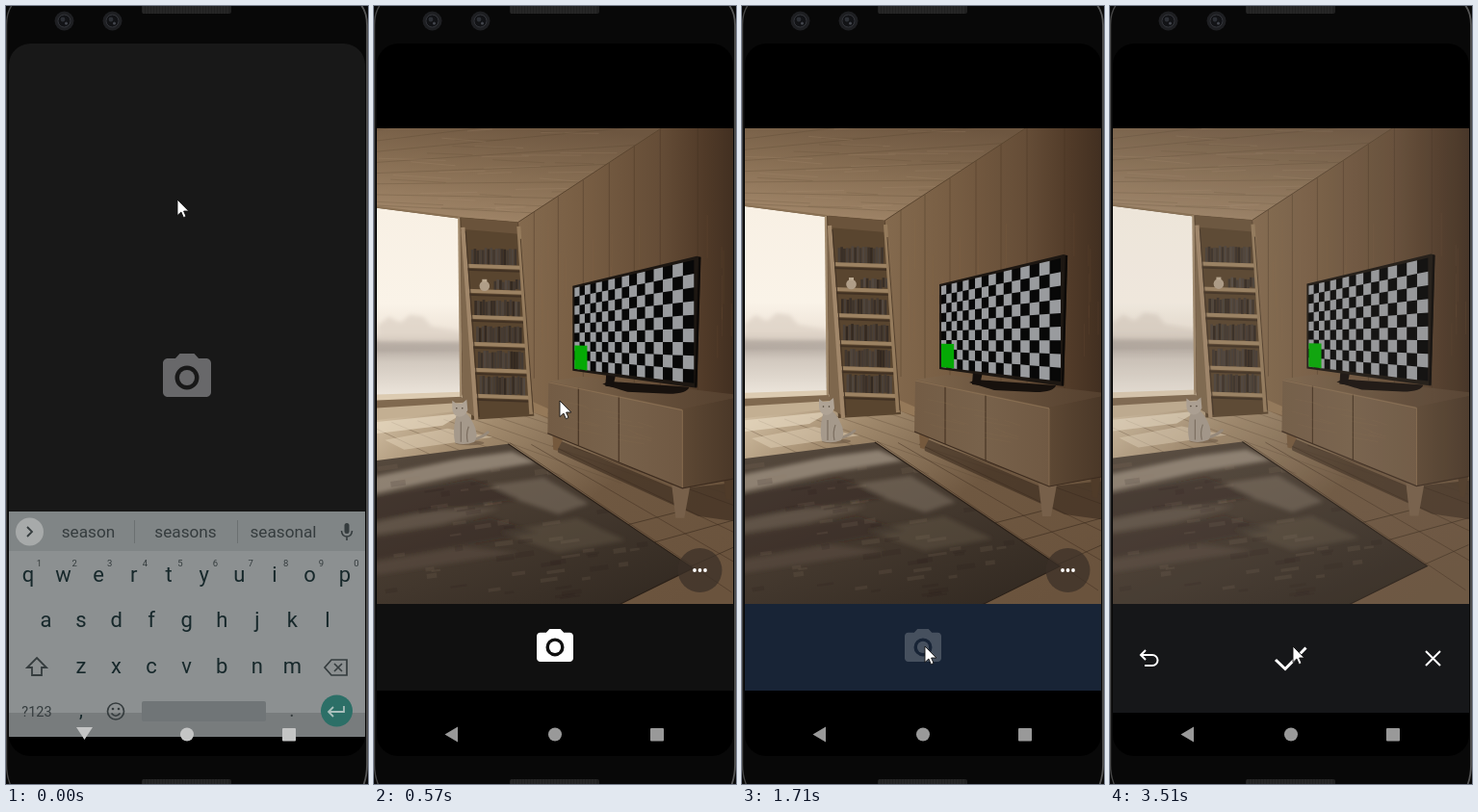
An HTML page for the animation above (3.81 s loop, 376 by 808 pixels).

```html
<!DOCTYPE html>
<html lang="en">
<head>
<meta charset="utf-8">
<title>Camera capture</title>
<style>
html, body { margin: 0; width: 100%; height: 100%; overflow: hidden; background: #000; }
svg { display: block; width: 376px; height: 808px; }
text { font-family: Roboto, "Noto Sans", sans-serif; text-anchor: middle; }
</style>
</head>
<body>
<svg id="stage" viewBox="0 0 376 808" xmlns="http://www.w3.org/2000/svg"></svg>
<script>
const LOOP = 3810;

// Seeded random numbers keep the textures stable.
let seed = 11;
const rnd = () => (seed = (seed * 16807) % 2147483647) / 2147483647;
const span = (a, b) => a + (b - a) * rnd();
const mix = (a, b, k) => a + (b - a) * k;
const list = (n, fn) => Array.from({ length: n }, (_, i) => fn(i)).join('');

const poly = (pts, fill, extra = '') => `<polygon points="${pts}" fill="${fill}" ${extra}/>`;
const rect = (x, y, w, h, fill, extra = '') =>
  `<rect x="${x}" y="${y}" width="${w}" height="${h}" fill="${fill}" ${extra}/>`;
const circle = (x, y, r, fill, extra = '') => `<circle cx="${x}" cy="${y}" r="${r}" fill="${fill}" ${extra}/>`;
const line = (d, stroke, w = 1, extra = '') =>
  `<path d="${d}" fill="none" stroke="${stroke}" stroke-width="${w}" ${extra}/>`;
const text = (x, y, size, fill, s, extra = '') =>
  `<text x="${x}" y="${y}" font-size="${size}" fill="${fill}" ${extra}>${s}</text>`;
const gradient = (id, dir, ...stops) => {
  const [x1, y1, x2, y2] = dir;
  return `<linearGradient id="${id}" x1="${x1}" y1="${y1}" x2="${x2}" y2="${y2}">` +
    stops.map(([o, c]) => `<stop offset="${o}" stop-color="${c}"/>`).join('') + '</linearGradient>';
};

const DOWN = [0, 0, 0, 1], RIGHT = [0, 0, 1, 0];
const defs = `<defs>
  ${gradient('sky', DOWN, [0, '#f8f0e4'], [.5, '#faf3e8'], [.65, '#eee4d8'], [.7, '#cbc0b5'], [.74, '#bab0a7'], [.8, '#d2c9bf'], [1, '#f0e9df'])}
  ${gradient('ceiling', [.6, 0, .2, 1], [0, '#6d5640'], [.5, '#876e53'], [1, '#a2876a'])}
  ${gradient('wall', RIGHT, [0, '#846a4e'], [.3, '#775d43'], [.62, '#654d37'], [.82, '#503a28'], [1, '#3c2b1e'])}
  ${gradient('floor', [0, 0, 1, .7], [0, '#d6c4a8'], [.25, '#a18a6d'], [.6, '#6f5841'], [1, '#6a533d'])}
  ${gradient('rug', [0, 0, .8, 1], [0, '#574b3f'], [.4, '#493d32'], [1, '#332a22'])}
  ${gradient('front', RIGHT, [0, '#735c45'], [.5, '#78624b'], [1, '#705943'])}
  ${gradient('top', RIGHT, [0, '#7f674d'], [.5, '#66503b'], [1, '#523e2d'])}
  ${gradient('side', RIGHT, [0, '#5d4834'], [1, '#463425'])}
  <clipPath id="screen"><rect x="3" y="39" width="370" height="740" rx="22"/></clipPath>
  <clipPath id="photo"><rect x="3" y="127" width="370" height="494"/></clipPath>
  <clipPath id="rugArea"><polygon points="-5,471 138,453 330,582 243,625 -5,625"/></clipPath>
  <clipPath id="ceilArea"><polygon points="-5,120 305,120 148,223 88,218 -5,207"/></clipPath>
  <filter id="soft" x="-20%" y="-50%" width="140%" height="200%"><feGaussianBlur stdDeviation="2.2"/></filter>
</defs>`;

const CAMERA = 'M9 2L7.17 4H4c-1.1 0-2 .9-2 2v12c0 1.1.9 2 2 2h16c1.1 0 2-.9 2-2V6c0-1.1-.9-2-2-2h-3.17L15 2z' +
  'M12 17a5 5 0 1 1 0-10a5 5 0 0 1 0 10z';
const cameraIcon = (id, cx, cy, k, fill) =>
  `<g id="${id}" transform="translate(${cx - 12 * k} ${cy - 11 * k}) scale(${k})" fill="${fill}">
    <path fill-rule="evenodd" d="${CAMERA}"/><circle cx="12" cy="12" r="3.2"/></g>`;

function body() {
  const lens = x => circle(x, 15.5, 10, '#1e1f22') + circle(x, 15.5, 6.5, '#121316', 'stroke="#33353a"') +
    circle(x - 1.5, 14, 2.4, '#2c2f35') + circle(x + 2, 18, 1.5, '#44474e');
  const grille = (y, h) => rect(141, y, 93, h, '#202020', 'rx="2"') +
    list(30, i => line(`M${143 + i * 3} ${y}v${h}`, '#303030', .8));
  return rect(0, 0, 376, 808, '#080808') +
    line('M7 -2Q.5 6 .5 20V788Q.5 800 5 810', '#454545', 1.4) +
    line('M368 -2Q375 6 375 20V788Q375 800 371 810', '#565656', 1.8) +
    grille(-2, 10) + grille(803, 8) + lens(60.5) + lens(110.5) +
    rect(3, 39, 370, 740, '#000', 'rx="22"');
}

function windowView() {
  return poly('-5,207 87,219 88,403 -5,408', 'url(#sky)') +
    `<g filter="url(#soft)">${poly('3,330 14,321 26,327 36,319 50,321 58,331 88,336 88,346 3,346', '#dcd1c5', 'opacity=".7"')}
     ${poly('-5,346 89,347 89,355 -5,357', '#aaa098', 'opacity=".5"')}</g>` +
    poly('-5,402 89,399 91,406 -5,410', '#dccbb1') +
    poly('-5,408 90,404 93,411 -5,417', '#80694f') +
    poly('-5,416 93,410 95,419 -5,430', '#c3af92') +
    line('M-5 206L88 218', '#8a7154', 2) + line('M87 218L89 404', '#a18a6d', 2.4);
}

function shelf() {
  const left = y => 91 + (y - 230) * .066, right = y => 149 + (y - 228) * .067;
  const rows = [[249, 268], [282, 294], [303, 321], [330, 349], [356, 376], [382, 403]];
  const book = (x, top, base) => {
    const tone = span(40, 74) | 0;
    return rect(x, top + span(0, 3), 2.6, base - top - 2, `rgb(${tone + 10},${tone},${tone - 8})`);
  };
  let out = poly('88,218 148,223 165,424 100,428', '#59452f') + poly('89,218 148,223 149,235 90,230', '#6a533b') +
    poly('89,232 92,232 104,425 91,418', '#7e674d');
  rows.forEach(([top, base], r) => {
    const x0 = left(base) + 6, n = r === 1 ? 10 : 17;
    out += list(n, i => book(x0 + (r === 1 ? 22 : 0) + i * 2.8, top, base));
    out += poly(`${left(base)},${base - 2} ${right(base)},${base} ${right(base)},${base + 4} ${left(base)},${base + 2}`, '#9c8262');
    out += line(`M${left(base)} ${base + 4}L${right(base)} ${base + 6}`, '#33261c', 2, 'opacity=".6"');
  });
  return out + circle(113.5, 289, 5.3, '#b09e88') + rect(111, 282, 5, 3, '#bba991') +
    line('M91 228L105 428', '#a1876a', 4.2) + line('M94 232L108 425', '#443426', 1) +
    line('M149 227L162 422', '#957b5c', 4) + line('M151 240L164 420', '#54402d', 1);
}

function walls() {
  return poly('148,223 305,120 385,120 385,415 180,430 163,424', 'url(#wall)') +
    [[165, 212], [190, 196], [216, 179], [243, 161], [269, 143], [296, 124], [335, 120]].map(([x, y]) =>
      line(`M${x} ${y}V${385 + (x - 165) * .1}`, '#402f20', 1, 'opacity=".35"')).join('') +
    list(28, () => {
      const x = span(170, 370), y = span(215, 330);
      return line(`M${x} ${y}v${span(15, 60)}`, '#987553', 1, 'opacity=".1"');
    }) +
    line('M148 223L163 420', '#57422e', 1.4) +
    poly('163,409 181,417 181,426 163,420', '#957959') +
    poly('-5,120 305,120 148,223 88,218 -5,207', 'url(#ceiling)') +
    `<g clip-path="url(#ceilArea)">
      ${list(9, i => line(`M-5 ${128 + i * 11}L310 ${80 + i * 20}`, '#493727', .8, 'opacity=".25"'))}
      ${list(34, () => {
        const x = span(0, 220), y = span(128, 215);
        return line(`M${x} ${y}l${span(25, 70)} ${span(-2, 4)}`, rnd() > .5 ? '#b0957a' : '#574331', 1, 'opacity=".18"');
      })}</g>` +
    line('M148 223L305 120', '#5b4630', 1) + line('M-5 207L88 218L148 223', '#6a543c', 1.2);
}

function ground() {
  const glow = (pts, tone, o) => poly(pts, tone, `opacity="${o}"`);
  return poly('-5,429 95,418 163,420 182,428 385,510 385,630 -5,630', 'url(#floor)') +
    list(8, i => line(`M${-10 + i * 27} ${432 - i * 1.5}L${70 + i * 62} ${470 + i * 8}`, '#604d38', .9, 'opacity=".4"')) +
    list(5, i => line(`M${140 + i * 22} ${452 + i * 1.5}L${370 + i * 12} ${607 - i * 26}`, '#3d2c1e', 1, 'opacity=".45"')) +
    glow('-5,431 92,421 70,434 -5,443', '#eddfc8', .6) +
    glow('10,449 75,437 122,446 30,459', '#e3d3b9', .5) +
    glow('186,447 312,500 385,492 385,535 335,528 190,462', '#34261a', .55) +
    line('M262 537L317 523M317 585L373 560M290 555L373 532', '#392a1d', 1, 'opacity=".6"') +
    poly('-5,471 138,453 330,582 243,625 -5,625', 'url(#rug)') +
    `<g clip-path="url(#rugArea)"><g filter="url(#soft)">
      ${glow('-5,488 90,468 142,461 168,472 90,485 -5,506', '#a39686', .75)}
      ${glow('120,496 175,488 222,515 190,526 150,512', '#86796a', .5)}
      ${glow('-5,536 60,522 130,520 70,536 -5,548', '#7b6e5f', .45)}
      ${glow('130,545 210,530 260,553 190,566', '#6f6152', .35)}
      ${glow('-5,577 90,560 150,566 -5,590', '#6a5c4d', .35)}
      ${glow('-5,508 100,490 150,510 -5,533', '#2b221b', .35)}
      ${glow('-5,551 120,530 170,545 -5,574', '#2b221b', .3)}</g>
      ${list(70, () => {
        const x = span(0, 290), y = span(462, 615);
        return rect(x, y, span(8, 22), span(2, 6), rnd() > .5 ? '#8b7b69' : '#211a14',
          `opacity=".15" transform="rotate(-8 ${x} ${y})"`);
      })}</g>` +
    line('M138 453L330 582L243 625', '#2a2018', 1.2);
}

function cat() {
  return `<ellipse cx="98" cy="452" rx="15" ry="2.5" fill="#6a5743" opacity=".6"/>` +
    line('M101 449Q112 446 117 441', '#978a7b', 3, 'stroke-linecap="round"') +
    `<path d="M84 424Q80 440 83 452Q93 455 103 451Q108 444 102 432Q98 424 94 421Z" fill="#a5998b"/>
     <path d="M80 408L84 411H90L95 407L96 418Q93 425 87 425Q80 423 80 416Z" fill="#afa395"/>` +
    line('M89 430V451M97 435Q94 443 96 451', '#7b6e60', 1.2) + circle(84.5, 416, .8, '#4c4034') + circle(90.5, 416, .8, '#4c4034');
}

function cabinet() {
  return poly('362,488 373,486 369,511 364,510', '#4f3b29') +
    poly('184,441 196,446 189,460 185,459', '#75593d') +
    poly('308,496 327,497 321,530 312,530', '#77604a') +
    poly('319,417 385,403 385,487 319,499', 'url(#side)') +
    poly('180,388 214,383 385,403 319,417', 'url(#top)') +
    poly('180,388 319,417 319,499 179,442', 'url(#front)') +
    line('M211 395V455M253 404V472', '#493625', 1.2) +
    line('M180 389L319 418V499', '#8e7355', .8) + line('M179 442L319 499L373 489', '#3d2c1f', 1.2) +
    list(16, () => {
      const x = span(184, 285), y = 396 + (x - 180) * .22 + span(4, 38);
      return line(`M${x} ${y}l${span(10, 28)} 5`, '#8d7253', 1, 'opacity=".15"');
    });
}

function tv() {
  const L = { x: 207, top: 291, base: 375 }, R = { x: 331, top: 262, base: 390 };
  const cols = 16, rows = 9;
  const at = (u, v) => {
    const a = (1 - u) / (L.base - L.top), b = u / (R.base - R.top), k = b / (a + b);
    const y = mix(mix(L.top, R.top, k), mix(L.base, R.base, k), v);
    return `${mix(L.x, R.x, k).toFixed(2)},${y.toFixed(2)}`;
  };
  const quad = (u0, v0, u1, v1) => [at(u0, v0), at(u1, v0), at(u1, v1), at(u0, v1)].join(' ');
  let out = `<path d="M236 391L243 388L270 390L326 394Q324 401 305 401L262 399Z" fill="#17110d"/>` +
    poly('240,379 250,380 247,394 239,393', '#15100d') +
    poly('205,289 334,258 338,259 334,395 205,377', '#1d1712') + line('M337 259L333 394', '#0d0a08', 2.4) +
    poly(quad(0, 0, 1, 1), '#080808');
  for (let r = 0; r < rows; r++)
    for (let c = 0; c < cols; c++)
      if ((r + c) % 2 === 0) out += poly(quad(c / cols, r / rows, (c + 1) / cols, (r + 1) / rows), '#999b9e');
  return out + poly(quad(0, .71, .153, 1), '#05a905');
}

const room = () => `<g clip-path="url(#photo)"><g id="room">
  ${rect(-10, 110, 400, 530, '#6b543d')}${walls()}${windowView()}${ground()}${shelf()}${cat()}${cabinet()}${tv()}</g></g>`;

const navShapes = (back, fill) => poly(back, fill) + circle(188, 756.5, 7, fill) + rect(287, 750, 14, 13.5, fill, 'rx="1"');

function keyboard() {
  const ink = '#17282b', dim = '#353c3e';
  const row = (keys, x, y) => [...keys].map((k, i) => text(x + i * 36.55, y, 22, ink, k)).join('');
  return rect(3, 525, 370, 234, '#8c9091') + rect(3, 525, 370, 41, '#808586') +
    circle(24.5, 546, 14.5, '#a7aaaa') + line('M22 541L27 546L22 551', dim, 1.8) +
    line('M133.5 534V558M240.5 534V558', '#6b7071', 1) +
    [[85.5, 'season'], [186.5, 'seasons'], [288, 'seasonal']].map(([x, s]) => text(x, 552, 17.2, dim, s)).join('') +
    rect(351.5, 537, 5, 11, dim, 'rx="2.5"') + line('M348.5 545Q349 551 354 551T359.5 545M354 551V555', dim, 1.6) +
    row('qwertyuiop', 23, 598) + row('asdfghjkl', 41.5, 645) + row('zxcvbnm', 78, 693) +
    [...'1234567890'].map((n, i) => text(34.5 + i * 36.6, 582, 9.5, dim, n)).join('') +
    line('M32 677L42 687H37V695H27V687H22Z', dim, 1.8) +
    line('M338 679H354V695H338L331 687ZM341 683L349 691M349 683L341 691', dim, 1.7) +
    rect(3, 734, 370, 25, '#000', 'opacity=".14"') +
    text(32, 738, 14.5, dim, '?123') + text(78, 738, 20, ink, ',') + text(297, 738, 20, dim, '.') +
    circle(114, 732.5, 8.5, 'none', `stroke="${dim}" stroke-width="1.7"`) + circle(111, 730, 1.3, dim) + circle(117, 730, 1.3, dim) +
    line('M109.5 734.5Q114 740 118.5 734.5', dim, 1.6) +
    rect(141, 722, 129, 21, '#707577', 'rx="2"') +
    circle(343.5, 732, 16.5, '#2c6f67') + line('M351 727V733H335M340 728L335 733L340 738', '#a9bfbc', 1.8) +
    navShapes('73,749 90,749 81.5,762', '#c4c5c5');
}

function review() {
  return rect(3, 127, 370, 494, '#8a8078', 'opacity=".1"') + rect(3, 621, 370, 113, '#161719') +
    line('M37 669L32 674L37 679M32 674H44A5.5 5.5 0 0 1 44 685H36', '#fff', 2) +
    line('M172 679L182 688.5L203.5 666.5', '#fff', 3) +
    line('M328 670L343 685M343 670L328 685', '#fff', 2);
}

const controls = () => rect(3, 621, 370, 90, '#101010', 'id="bar"') + cameraIcon('shutter', 188, 664, 1.9, '#fff') +
  circle(338.5, 586, 23, '#3b3027', 'opacity=".72"') + [333, 338.5, 344].map(x => circle(x, 586, 1.9, '#fff')).join('');

const stage = document.getElementById('stage');
stage.innerHTML = defs + body() + `<g clip-path="url(#screen)">
  <g id="view">${room()}</g>
  <g id="controls">${controls()}</g>
  <g id="review">${review()}</g>
  <g id="nav">${navShapes('73.5,756.5 87,748.5 87,764.5', '#999')}</g>
  <g id="cover">${rect(3, 39, 370, 672, '#181818')}${cameraIcon('splash', 188, 383.5, 2.5, '#68686a')}</g>
  <g id="keyboard">${keyboard()}</g></g>
  <path id="pointer" d="M0 0V16.6L3.9 13L6.4 18.7L9 17.5L6.6 12H11.8Z" fill="#fff" stroke="#111" stroke-width=".9"/>`;

const el = id => document.getElementById(id);
const show = (id, on) => { el(id).style.display = on ? '' : 'none'; };

// time, screen, cover opacity, room shift x/y, pointer x/y, shutter opacity, bar colour
const steps = [
  [0, 'keyboard', 1, 0, 0, 178, 201],
  [150, 'camera', 1, 0, 0, 178, 201],
  [270, 'camera', .13, .6, 1.2, 177.5, 200.5],
  [420, 'camera', .04, 1, 1.5, 177.5, 200.5, .97],
  [570, 'camera', 0, 1.3, 1.8, 193, 410],
  [720, 'camera', 0, 1.6, 2, 208, 602],
  [870, 'camera', 0, 1.7, 2, 208, 602],
  [1020, 'camera', 0, 1.5, 1.8, 199, 640],
  [1140, 'camera', 0, 1.2, 1.6, 190, 661],
  [1290, 'camera', 0, 1, 1.4, 190, 665],
  [1410, 'camera', 0, .8, 1.2, 190, 665],
  [1560, 'camera', 0, .4, .6, 190, 665, .6, '#151d29'],
  [1710, 'camera', 0, 0, 0, 190, 665, .2, '#182436'],
  [1860, 'camera', 0, -.3, -.2, 190, 665, .2, '#121419'],
  [2140, 'camera', 0, -.5, -.3, 190, 665, .2, '#121419'],
  [2400, 'review', 0, -.6, -.4, 190, 665]
];

let last = null;
function draw(step) {
  const [, mode, cover, dx, dy, px, py, shutter = 1, bar = '#101010'] = step;
  show('keyboard', mode === 'keyboard');
  show('view', mode !== 'keyboard');
  show('nav', mode !== 'keyboard');
  show('controls', mode === 'camera');
  show('review', mode === 'review');
  show('cover', cover > 0);
  el('cover').setAttribute('opacity', cover);
  el('room').setAttribute('transform', `translate(${dx} ${dy})`);
  el('pointer').setAttribute('transform', `translate(${px} ${py})`);
  el('shutter').setAttribute('opacity', shutter);
  el('bar').setAttribute('fill', bar);
}

const start = performance.now();
function tick() {
  const t = (performance.now() - start) % LOOP;
  const step = steps.findLast(s => s[0] <= t);
  if (step !== last) draw(last = step);
  requestAnimationFrame(tick);
}
tick();
</script>
</body>
</html>
```
